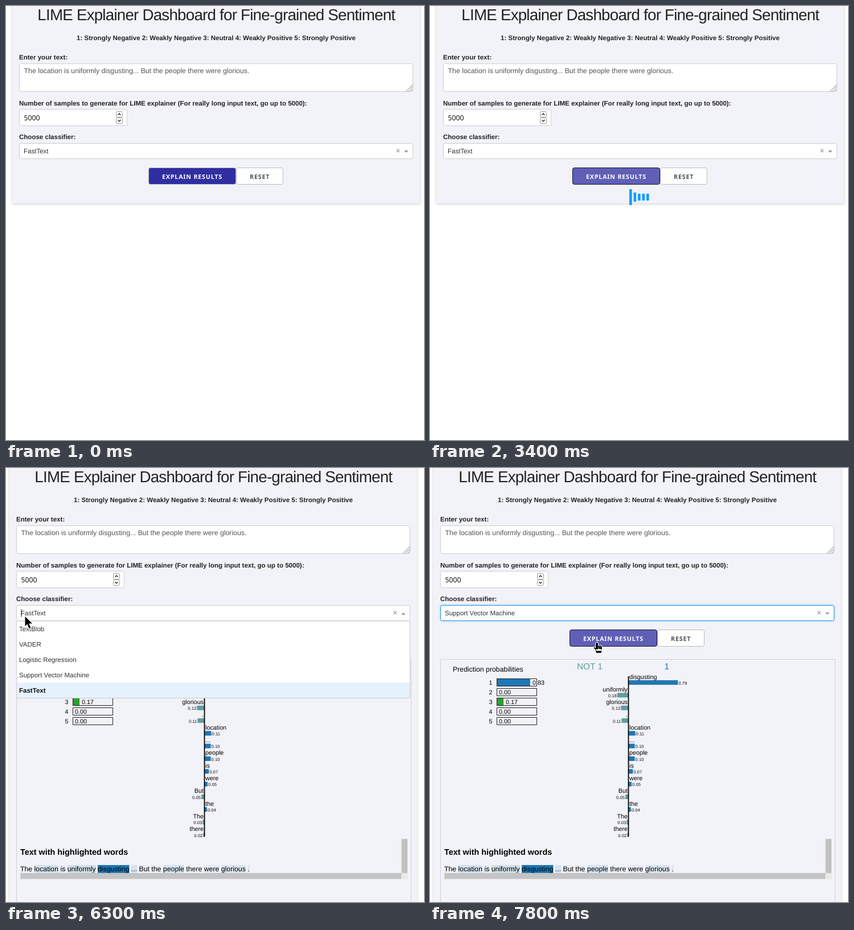
Write an HTML page with a canvas that moves like this. It is 734 px wide and 763 px high and loops after 8000 ms.

```html
<!DOCTYPE html>
<html lang="en">
<head>
<meta charset="utf-8">
<title>Sentiment explainer dashboard</title>
<style>
  html, body { margin: 0; width: 100%; height: 100%; overflow: hidden; background: #fff; }
  canvas { display: block; }
</style>
</head>
<body>
<canvas id="stage" width="734" height="763"></canvas>
<script>
const ctx = document.getElementById('stage').getContext('2d');
const LOOP = 8000;
const SANS = '"Liberation Sans", Arial, sans-serif';
const NOTO = '"Noto Sans", "Open Sans", sans-serif';
const PANEL = '#f2f2f9', BLUE = '#1f77b4', TEAL = '#5f9ea0';
const SMALL = 10.77, BODY = 11.54, LARGE = 12.3;

const OPTIONS = ['TextBlob', 'VADER', 'Logistic Regression', 'Support Vector Machine', 'FastText'];
// Positive weights support class 1, negative ones oppose it.
const WEIGHTS = [
  ['disgusting', 0.79], ['uniformly', -0.18], ['glorious', -0.12], ['.', -0.11],
  ['location', 0.11], ['...', 0.10], ['people', 0.10], ['is', 0.07], ['were', 0.05],
  ['But', -0.05], ['the', 0.04], ['The', -0.03], ['there', -0.02]
];
const PROBABILITIES = [0.83, 0, 0.17, 0, 0];

// [time, x, y, shape]; a missing shape hides the pointer.
const POINTER = [
  [0], [700, 20, 120, 'arrow'], [1500, 262, 269, 'arrow'],
  [1600, 272, 287, 'hand'], [1700, 276, 293, 'hand'], [1800, 278, 295, 'hand'],
  [1900, 274, 300, 'hand'], [2000, 236, 316, 'arrow'], [2300, 60, 352, 'arrow'], [2400],
  [5600, 0, 290, 'resize'], [5800, 8, 274, 'arrow'], [5900, 25, 258, 'arrow'],
  [6000, 33, 251, 'arrow'], [6100, 33, 251, 'arrow'], [6300, 33, 260, 'arrow'],
  [6400, 33, 260, 'arrow'], [6500, 38, 302, 'arrow'], [6600, 38, 302, 'arrow'],
  [6700, 40, 352, 'arrow'], [6800, 40, 358, 'arrow'], [6900, 40, 358, 'arrow'],
  [7000, 38, 362, 'arrow'], [7100, 36, 365, 'arrow'], [7200, 36, 365, 'arrow'],
  [7300, 130, 357, 'arrow'], [7400, 218, 343, 'arrow'], [7500, 218, 343, 'arrow'],
  [7600, 258, 334, 'arrow'], [7700, 258, 334, 'arrow'], [7800, 293, 307, 'hand']
];
// [time, spinner phase in seconds]
const SPINNER = [
  [2000, 0], [2100, 0.08], [2200, 0.18], [2300, 0.28], [2400, 0.38], [3000, 0],
  [3200, 0.077], [3400, 0.183], [3500, 0.28], [3600, 0.38], [3700, 0.48]
];

const lastBefore = (keys, t) => keys.filter(k => k[0] <= t).pop();

function text(str, x, y, size, { color = '#222', bold = false, align = 'left', spacing = 0, family = SANS } = {}) {
  ctx.font = `${bold ? 'bold ' : ''}${size}px ${family}`;
  ctx.textAlign = align;
  ctx.letterSpacing = spacing + 'px';
  ctx.textRendering = 'geometricPrecision';
  ctx.fillStyle = color;
  ctx.fillText(str, x, y);
}

function rect(x, y, w, h, color) {
  ctx.fillStyle = color;
  ctx.fillRect(x, y, w, h);
}

function box(x, y, w, h, fill, stroke, radius = 3) {
  ctx.beginPath();
  ctx.roundRect(x + 0.5, y + 0.5, w - 1, h - 1, radius);
  if (fill) { ctx.fillStyle = fill; ctx.fill(); }
  ctx.strokeStyle = stroke;
  ctx.lineWidth = 1;
  ctx.stroke();
}

function line(points, color, width) {
  ctx.beginPath();
  points.forEach(([x, y]) => ctx.lineTo(x, y));
  ctx.strokeStyle = color;
  ctx.lineWidth = width;
  ctx.stroke();
}

function polygon(points, color) {
  ctx.beginPath();
  points.forEach(([x, y]) => ctx.lineTo(x, y));
  ctx.closePath();
  ctx.fillStyle = color;
  ctx.fill();
}

function drawPanel(height) {
  ctx.save();
  ctx.shadowColor = 'rgba(0,0,0,0.2)';
  ctx.shadowBlur = 5;
  ctx.shadowOffsetY = 1;
  rect(6, -20, 716, height + 20, PANEL);
  ctx.restore();
}

function drawForm(state) {
  text('LIME Explainer Dashboard for Fine-grained Sentiment', 364.3, 25, 27.72, { align: 'center', spacing: -0.77 });
  text('1: Strongly Negative 2: Weakly Negative 3: Neutral 4: Weakly Positive 5: Strongly Positive',
    364, 59.5, BODY, { bold: true, align: 'center' });

  text('Enter your text:', 18, 94, BODY, { bold: true });
  box(18, 101, 692, 50, '#fff', '#cdcdd0');
  text('The location is uniformly disgusting... But the people there were glorious.', 26.6, 118, LARGE, { color: '#555' });
  for (const d of [12, 8, 4]) line([[709.5 - d, 150], [709.5, 150 - d]], '#777', 1);

  text('Number of samples to generate for LIME explainer (For really long input text, go up to 5000):',
    18, 174.5, BODY, { bold: true });
  box(18, 181, 190, 30, '#fff', '#cdcdd0');
  text('5000', 26.5, 201, LARGE, { color: '#111', family: NOTO });
  for (const [y, dir] of [[185, -1], [196, 1]]) {
    box(188, y, 12, 11, '#fff', '#999', 2);
    line([[191.5, y + 5.5 - dir * 1.4], [194, y + 5.5 + dir * 1.4], [196.5, y + 5.5 - dir * 1.4]], '#222', 1.3);
  }

  text('Choose classifier:', 18, 234, BODY, { bold: true });
  drawSelect(state);
  drawButtons(state.active);
}

function drawSelect({ hover, open, focused, value }) {
  if (focused) {
    ctx.save();
    ctx.shadowColor = 'rgba(0,136,204,0.5)';
    ctx.shadowBlur = 4;
    rect(19, 242, 690, 26, '#fff');
    ctx.restore();
  }
  if (hover) rect(20, 269, 688, 1, 'rgba(0,0,0,0.08)');
  box(18, 241, 692, 28, '#fff', focused ? '#1692e0' : '#ccc');
  text(value, 26, 259, BODY, { color: '#333' });
  if (open) rect(26.5, 248, 1, 14, '#222');
  line([[680.7, 251.7], [686, 257]], '#999', 1.2);
  line([[686, 251.7], [680.7, 257]], '#999', 1.2);
  const [base, tip] = open ? [258, 254] : [254, 258];
  polygon([[694, base], [701.6, base], [697.8, tip]], '#999');
}

function drawButtons(active) {
  box(399, 284, 83, 30, '#fff', '#bbb');
  box(245, 284, 154, 30, active ? '#605fb6' : '#302ea1', active ? '#111133' : '#bbb');
  const style = { bold: true, spacing: 0.77, family: NOTO };
  text('EXPLAIN RESULTS', 269, 304, SMALL, { ...style, color: '#fff' });
  text('RESET', 423, 304, SMALL, { ...style, color: '#505050' });
}

// Bar i trails bar 0 by i * 0.1 s: up in 0.24 s, down in 0.24 s, then rest.
function drawSpinner(phase) {
  const ease = u => u < 0.5 ? 2 * u * u : 1 - 2 * (1 - u) ** 2;
  for (let i = 0; i < 5; i++) {
    const rise = Math.max(0, 1 - Math.abs((phase - i * 0.1) / 0.24 - 1));
    const h = 30 * (0.4 + 0.6 * ease(rise));
    rect(345 + i * 7.5, 336 - h / 2, 4.6, h, '#119dff');
  }
}

function drawProbabilities() {
  const black = { color: '#000' };
  text('Prediction probabilities', 40, 358, LARGE, black);
  PROBABILITIES.forEach((p, i) => {
    const y = 370 + i * 16.95;
    text(i + 1, 109.6, y + 11, SMALL, { ...black, align: 'right' });
    rect(117, y, p * 71, 13.5, i === 0 ? BLUE : '#2ca02c');
    box(117, Math.round(y), 71, 14, null, '#222', 0);
    text(p.toFixed(2), 121 + p * 71, y + 11, SMALL, black);
  });
}

function drawWeights() {
  text('NOT 1', 258, 354, 15.38, { color: TEAL });
  text('1', 411.5, 354, 15.38, { color: BLUE });
  WEIGHTS.forEach(([word, w], i) => {
    const y = 370.5 + i * 22.33, len = w * 110;
    const align = w > 0 ? 'left' : 'right', side = Math.sign(w);
    rect(348.5, y + 2.6, len, 8, w > 0 ? BLUE : TEAL);
    text(word, 348.5 + side * 1.5, y, SMALL, { color: '#000', align });
    text(Math.abs(w).toFixed(2), 348.5 + len + side, y + 10.3, 7.7, { color: '#111', align });
  });
  rect(347.6, 366, 1.8, 282, '#000');
}

function drawHighlights() {
  text('Text with highlighted words', 25, 679.5, 14.4, { bold: true, color: '#000' });
  const weightOf = Object.fromEntries(WEIGHTS);
  let x = 25;
  for (const word of 'The location is uniformly disgusting ... But the people there were glorious .'.split(' ')) {
    ctx.font = `${LARGE}px ${SANS}`;
    ctx.letterSpacing = '0px';
    const width = ctx.measureText(word).width, w = weightOf[word];
    ctx.globalAlpha = Math.abs(w) / 0.79;
    rect(x, 698, width, 14, w > 0 ? BLUE : TEAL);
    ctx.globalAlpha = 1;
    text(word, x, 709, LARGE, { color: '#000' });
    x += width + LARGE * 0.278;
  }
  rect(25, 712, 669.5, 10.5, '#c4c4c4');
  rect(694.5, 712, 10.5, 10.5, '#e8e8e4');
  rect(694.5, 652, 10.5, 60, '#c1c1c1');
}

function drawMenu(focus) {
  rect(18, 269, 692, 136, '#ccc');
  rect(19, 269.5, 690, 134.5, '#fff');
  OPTIONS.forEach((name, i) => {
    const y = 269.5 + i * 26.9;
    if (i === focus) rect(19, y, 690, 26.9, '#e5f2fe');
    text(name, 23, y + 17.7, BODY, { bold: i === 4, color: i === 4 ? '#111' : '#333' });
  });
}

function drawPointer(t) {
  const i = POINTER.filter(k => k[0] <= t).length - 1;
  const [start, x0, y0, shape] = POINTER[i];
  if (!shape) return;
  const next = POINTER[i + 1];
  const u = next && next[3] ? (t - start) / (next[0] - start) : 0;
  ctx.save();
  ctx.translate(u ? x0 + (next[1] - x0) * u : x0, u ? y0 + (next[2] - y0) * u : y0);
  ctx.beginPath();
  if (shape === 'arrow') {
    for (const [x, y] of [[0.5, 1], [0.5, 18], [4.4, 14.5], [7.4, 22], [10.4, 20.7], [7.3, 13.6], [13, 13.2]]) ctx.lineTo(x, y);
  } else if (shape === 'hand') {
    ctx.roundRect(-2, 0, 4, 12, 2);
    ctx.roundRect(-2, 5.5, 11, 9, 2.5);
    ctx.moveTo(-2, 10);
    for (const [x, y] of [[-4.5, 7.5], [-5.2, 9.2], [-2.5, 13], [-1, 18], [7.5, 18], [9, 12], [0, 10]]) ctx.lineTo(x, y);
  } else {
    for (const [x, y] of [[1, -5.5], [5.5, 0], [1, 5.5], [1, 2], [-2, 2], [-2, -2], [1, -2]]) ctx.lineTo(x, y);
  }
  ctx.closePath();
  ctx.lineJoin = 'round';
  ctx.lineWidth = 2;
  ctx.strokeStyle = '#fff';
  ctx.stroke();
  ctx.fillStyle = '#000';
  ctx.fill();
  if (shape === 'hand') for (const x of [2.3, 4.6, 6.9]) line([[x, 6.5], [x, 10]], '#bbb', 0.6);
  ctx.restore();
}

function draw(ms) {
  const t = Math.floor(ms / 100) * 100;
  const between = (a, b) => t >= a && t < b;
  const expanded = t >= 3900, open = between(6000, 7000);

  rect(0, 0, 734, 763, '#fff');
  ctx.save();
  ctx.translate(expanded ? 0 : 5, 0);
  drawPanel(expanded ? 800 : 347);
  drawForm({
    hover: between(1400, 1600) || between(5900, 6000),
    open,
    focused: t >= 7100,
    value: t >= 7000 ? OPTIONS[3] : OPTIONS[4],
    active: between(1600, 6000) || t >= 7800
  });
  if (between(2000, 3900)) drawSpinner(lastBefore(SPINNER, t)[1]);
  if (expanded) box(18, 336, 694, 500, null, '#d0d0d6', 0);
  if (between(4000, 4200)) text('Enter input text to see LIME explanations.', 25, 354, LARGE, { color: '#000' });
  if (t >= 4200) {
    drawProbabilities();
    drawWeights();
    drawHighlights();
  }
  if (open) drawMenu(lastBefore([[6000, 4], [6500, 1], [6700, 2], [6800, 3]], t)[1]);
  ctx.restore();
  drawPointer(t);
}

function tick() {
  draw(performance.now() % LOOP);
  requestAnimationFrame(tick);
}
tick();
</script>
</body>
</html>
```
